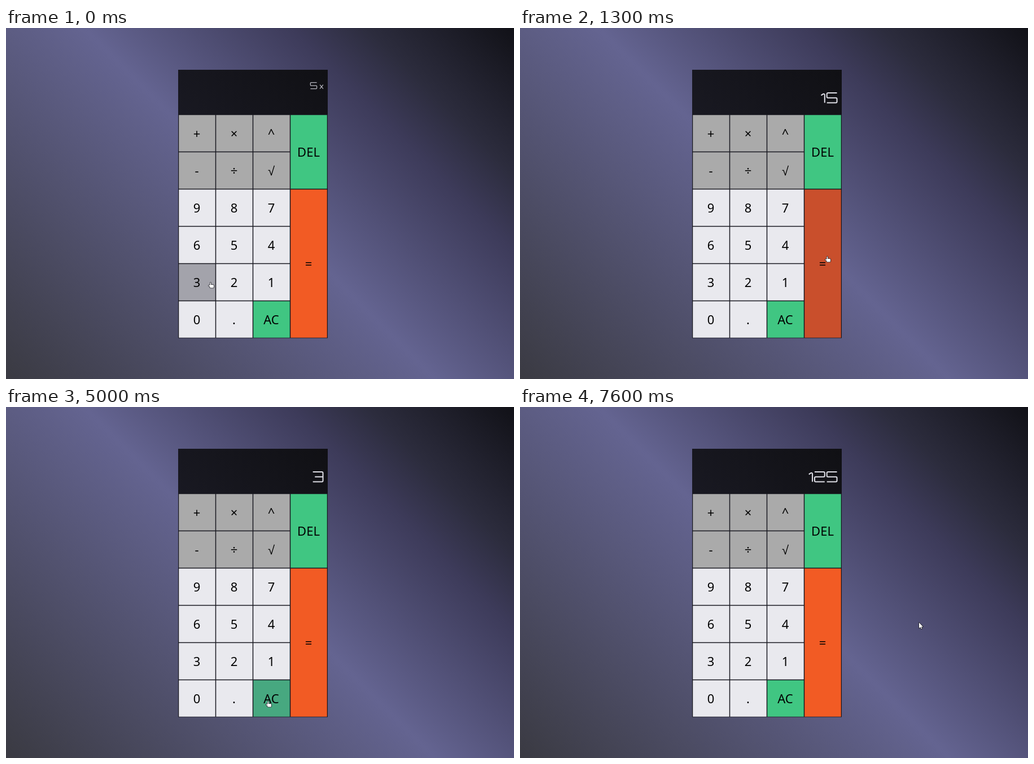
Recreate the animation shown at these times as an HTML page with a canvas. Size 900x622 px, loop 8 s.

```html
<!DOCTYPE html>
<html lang="en">
<head>
<meta charset="utf-8">
<title>Calculator</title>
<style>
  html, body { margin: 0; width: 100%; height: 100%; overflow: hidden; background: #4a4a66; }
  canvas { display: block; }
</style>
</head>
<body>
<canvas id="stage" width="900" height="622"></canvas>
<script>
const W = 900, H = 622, LOOP = 8000, TICK = 100;
const LEFT = 306, TOP = 154, PITCH = 66, INSET = 0.25;
const ctx = document.getElementById('stage').getContext('2d');

const COLORS = {
  digit: { base: '#e9e9ee', hot: '#a3a3ab' },
  op:    { base: '#aaaaaa', hot: '#bdbdbd' },
  green: { base: '#40c682', hot: '#47a880' },
  equal: { base: '#f25b24', hot: '#c94f2c' }
};

const keys = [];
function addKey(label, kind, col, row, span = 1) {
  keys.push({ label, kind, x: LEFT + col * PITCH, y: TOP + row * PITCH, w: PITCH - 1, h: span * PITCH - 1 });
}
['+×^', '-÷√', '987', '654', '321', '0.'].forEach((line, row) =>
  [...line].forEach((label, col) => addKey(label, row < 2 ? 'op' : 'digit', col, row)));
addKey('AC', 'green', 2, 5);
addKey('DEL', 'green', 3, 0, 2);
addKey('=', 'equal', 3, 2, 4);

// Pointer moves: start, end, then the place reached
const moves = [
  [500, 600, 536, 403],
  [600, 900, 540, 404],
  [1900, 2600, 401, 262],
  [4900, 4960, 460, 521],
  [5100, 5200, 461, 522],
  [6100, 6200, 658, 428],
  [6300, 6400, 706, 381]
];
const clicks = [[300, 500], [1100, 1300], [5900, 6000]];
const typing = [7300, 7600];

// Display contents: time, small line, large line
const readings = [
  [0, '5x', ''], [500, '5x', '3'], [1300, '', '15'], [5000, '', '3'],
  [6000, '', ''], [7300, '', '1'], [7400, '', '12'], [7600, '', '125']
];

const within = (t, [from, to]) => t >= from && t < to;

function pointerAt(t) {
  let x = 358, y = 450;
  for (const [from, to, nextX, nextY] of moves) {
    const p = Math.min(1, Math.max(0, (t - from) / (to - from)));
    const e = p * p * (3 - 2 * p);
    x += (nextX - x) * e;
    y += (nextY - y) * e;
  }
  return [x, y];
}

function keyAt([px, py]) {
  const x = px + 4;
  const hit = keys.find(k => x >= k.x && x <= k.x + k.w && py >= k.y && py <= k.y + k.h);
  return hit ? hit.label : '';
}

function gradient(x0, y0, x1, y1, stops) {
  const g = ctx.createLinearGradient(x0, y0, x1, y1);
  stops.forEach(([at, color]) => g.addColorStop(at, color));
  return g;
}

// A 45 degree ramp whose ends touch the stage corners
const half = (W + H) / 4;
const backdrop = gradient(W / 2 - half, H / 2 + half, W / 2 + half, H / 2 - half, [
  [0, '#3a3a42'], [0.5, '#646491'], [0.74, '#3d3b5a'], [0.83, '#2c2c3d'], [1, '#111117']
]);
const screen = gradient(352, 200, 524, 28, [[0, '#191922'], [1, '#101014']]);

function drawKey({ label, kind, x, y, w, h }, hot, pressed) {
  const face = [x + INSET, y + INSET, w - 2 * INSET, h - 2 * INSET];
  ctx.fillStyle = COLORS[kind][hot ? 'hot' : 'base'];
  ctx.fillRect(...face);
  if (hot && pressed) {
    ctx.fillStyle = 'rgba(0, 0, 0, 0.12)';
    ctx.fillRect(...face);
  }
  const family = label === '√' ? 'Liberation Sans' : 'Noto Sans';
  ctx.font = `22px "${family}", sans-serif`;
  ctx.fillStyle = '#000';
  ctx.fillText(label, Math.floor(x + w / 2), Math.round(y + h / 2 + 8.3));
}

// Glyph strokes run over a number pad: 7 8 9 on top, 1 2 3 at the bottom, f a flag
const STROKES = { 1: ['f93'], 2: ['796413'], 3: ['79631', '56'], 5: ['974631'], x: ['73', '91'] };

function padPoint(c, w, top) {
  if (c === 'f') return [0, 4.5];
  const i = c - 1;
  const x = c === '5' ? 0.2 : (i % 3) / 2;
  return [x * w, 18 - Math.floor(i / 3) * (18 - top) / 2];
}

function strokeGlyph(ch, w) {
  const top = ch === 'x' ? 6.5 : 0;
  for (const path of STROKES[ch]) {
    const points = [...path].map(c => padPoint(c, w, top));
    ctx.beginPath();
    ctx.moveTo(...points[0]);
    for (let i = 1; i < points.length - 1; i++) ctx.arcTo(...points[i], ...points[i + 1], 2);
    ctx.lineTo(...points.at(-1));
    ctx.stroke();
  }
}

function drawReading(text, top, scale, color) {
  ctx.save();
  ctx.translate(562.5, top);
  ctx.scale(scale, scale);
  ctx.translate(-1, 1);
  ctx.strokeStyle = color;
  ctx.lineWidth = 2.1;
  for (const ch of [...text].reverse()) {
    const w = ch === '1' ? 6.5 : ch === 'x' ? 9.5 : 18.4;
    ctx.translate(-w, 0);
    strokeGlyph(ch, w);
    ctx.translate(ch === 'x' ? -9 : -4, 0);
  }
  ctx.restore();
}

const arrow = new Path2D('M1 1V11L3.4 9L5 12.3L6.3 11.7L4.8 8.4H8Z');
const hand = new Path2D();
hand.roundRect(3.6, 1, 1.6, 7, 0.8);
hand.roundRect(3.2, 5, 6.8, 5.4, 1.2);
hand.roundRect(1, 5.8, 4, 2, 1);

function drawPointer([x, y], shape) {
  ctx.save();
  ctx.translate(Math.round(x), Math.round(y));
  ctx.strokeStyle = '#1c1c24';
  ctx.lineWidth = 1.6;
  ctx.lineJoin = 'round';
  ctx.stroke(shape);
  ctx.fillStyle = '#fff';
  ctx.fill(shape);
  ctx.restore();
}

function draw(time) {
  const t = Math.floor(time / TICK) * TICK;
  const [, small, large] = readings.findLast(([from]) => from <= t);
  const pressed = clicks.some(span => within(t, span));
  // Hover trails slightly behind the pointer
  const hot = within(t, typing) ? large.at(-1) : keyAt(pointerAt(t - 30));
  const pointer = pointerAt(t);

  ctx.fillStyle = backdrop;
  ctx.fillRect(0, 0, W, H);
  ctx.fillStyle = '#17171f';
  ctx.fillRect(305, 74, 265, 475.5);
  ctx.fillStyle = screen;
  ctx.fillRect(305, 74, 265, 79);

  ctx.textAlign = 'center';
  keys.forEach(key => drawKey(key, key.label === hot, pressed));

  const both = small && large;
  drawReading(small, both ? 89 : 96, 0.61, '#b9b9c1');
  drawReading(large, both ? 118 : 114, 0.97, '#dedee6');
  drawPointer(pointer, keyAt(pointer) ? hand : arrow);
}

const begin = performance.now();
function tick() {
  draw((performance.now() - begin) % LOOP);
  requestAnimationFrame(tick);
}
tick();
</script>
</body>
</html>
```
